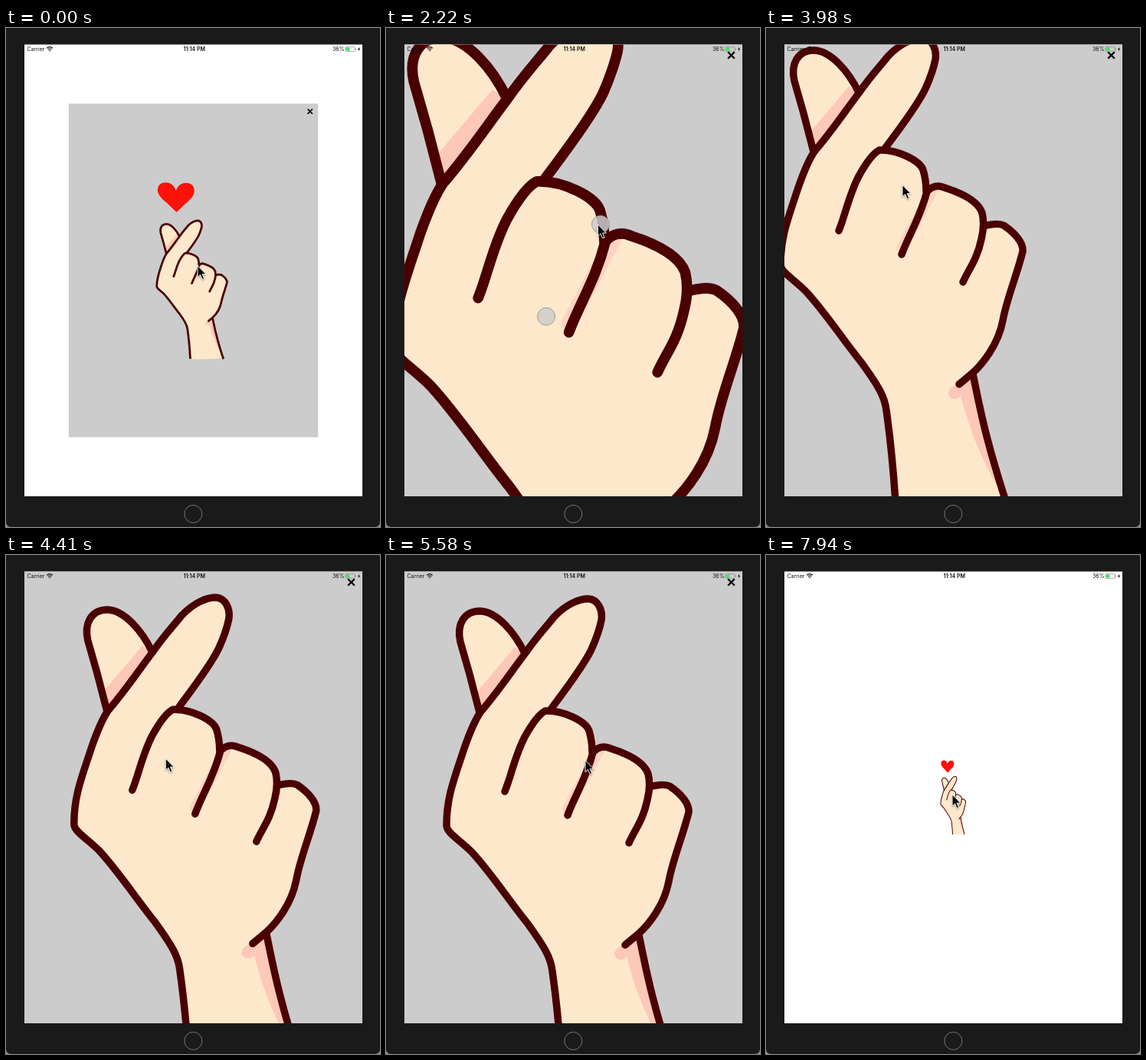
An HTML page for the animation above (8 s loop, 488 px wide and 650 px high).

```html
<!DOCTYPE html>
<html lang="en">
<head>
<meta charset="utf-8">
<title>Pinch to zoom</title>
<style>
  html, body { margin: 0; width: 100%; height: 100%; overflow: hidden; background: #8a8a8a; }
  svg { display: block; width: 488px; height: 650px; }
  text { font: 7px Inter, "Liberation Sans", sans-serif; fill: #111; }
  .skin { fill: #fee8cb; }
  .pink { fill: #fdc8b7; }
  .ink { fill: none; stroke: #4a0000; stroke-width: 9.5; stroke-linecap: round; stroke-linejoin: round; }
  .touch { fill: #ccc; fill-opacity: .85; stroke: #8c8c8c; stroke-width: .8; }
</style>
</head>
<body>
<svg viewBox="0 0 488 650">
  <defs>
    <clipPath id="screen"><rect x="24" y="21.5" width="441" height="588.5"/></clipPath>
    <g id="hand">
      <path fill="#ff1008" d="M171 53L131 14C104 -8 86 -25 86 -47C86 -70 103 -81 122 -81C146 -81 163 -65 168 -42C174 -65 192 -79 213 -79C237 -79 251 -65 251 -45C251 -22 235 -7 211 14Z"/>
      <!-- thumb -->
      <path class="skin" d="M125 238L112 188L100 146C95 124 104 106 126 106C148 107 171 134 184 161Z"/>
      <path class="pink" d="M171 153L184 163L127 238L121 212Z"/>
      <path class="ink" d="M125 238L112 188L100 146C95 124 104 106 126 106C148 107 171 134 184 161"/>
      <!-- palm and wrist -->
      <path class="skin" d="M82 388C82 348 92 325 105 285C112 265 118 250 126 238C150 210 165 187 184 162C200 139 211 128 222 114C238 97 255 90 267 90C280 91 286 105 284 118C282 128 276 145 271 156C262 175 240 205 218 234C242 238 264 250 268 262L273 290C279 283 288 281 296 285C318 292 340 303 345 318L347 335C358 332 366 331 373 334C388 344 399 357 398 368C390 400 377 430 372 458C366 490 345 515 333 526C342 570 348 610 382 712C360 705 345 716 320 709C295 716 260 710 233 712C230 660 225 610 220 575C218 558 211 545 187 512C165 485 140 447 115 420C98 403 82 395 82 388Z"/>
      <path class="pink" d="M301 553C301 546 308 542 315 541L333 528C342 570 348 610 382 700C358 668 332 615 317 556C314 562 302 562 301 553Z"/>
      <path d="M281 287L240 364" stroke="#fdd3c1" stroke-width="14" stroke-linecap="round"/>
      <g class="ink">
        <path d="M233 711C230 660 225 610 220 575C218 558 211 545 187 512C165 485 140 447 115 420C98 403 82 395 82 385C82 348 92 325 105 285C112 265 118 250 126 238C150 210 165 187 184 162C200 139 211 128 222 114C238 97 255 90 267 90C280 91 286 105 284 118C282 128 276 145 271 156C262 175 240 205 218 234" stroke-linecap="butt"/>
        <path d="M158 341C166 322 171 295 184 270C194 252 203 240 211 236C235 235 264 250 268 262C271 272 272 280 272 290"/>
        <path d="M240 372C250 345 264 325 273 290C279 283 288 281 296 285C318 292 340 303 345 318C348 330 347 340 344 352C338 380 328 390 320 408"/>
        <path d="M347 335C358 332 366 331 373 334C388 344 399 357 398 368C390 400 377 430 372 458C366 490 345 515 333 526L315 541"/>
        <path d="M333 528C342 570 348 610 382 712" stroke-linecap="butt"/>
      </g>
    </g>
  </defs>

  <path fill="#1a1a1a" d="M0 0H488V643Q488 650 481 650H7Q0 650 0 643Z"/>
  <circle cx="244.3" cy="633" r="11.5" fill="none" stroke="#777"/>
  <rect x="24" y="21.5" width="441" height="588.5" fill="#fff"/>
  <use href="#hand" transform="matrix(.104 0 0 .122 219.3 277.3)"/>

  <g id="popup" clip-path="url(#screen)">
    <rect x="24" y="21.5" width="441" height="588.5" fill="#ccc"/>
    <use id="photo" href="#hand"/>
    <path d="M446.2 31.2l8.6 8.6m0 -8.6l-8.6 8.6" stroke="#000" stroke-width="2.3"/>
  </g>

  <text x="27.5" y="30">Carrier</text>
  <g fill="none" stroke="#111" stroke-width="1.2">
    <path d="M53.2 26.3Q57 22.9 60.8 26.3M54.7 28Q57 26 59.3 28"/>
    <path d="M56 29.2L57 30.3L58 29.2Z" fill="#111" stroke-width=".5"/>
  </g>
  <text x="245.7" y="30" text-anchor="middle" style="font-weight:600">11:14 PM</text>
  <text x="426" y="30">36%</text>
  <rect x="442.8" y="24.6" width="12.4" height="5.8" rx="1" fill="none" stroke="#888" stroke-width=".7"/>
  <rect x="443.6" y="25.4" width="4.8" height="4.2" fill="#4cd964"/>
  <path d="M456 26.4v2.2" stroke="#888"/>
  <path d="M461.2 24.6L459 28H460.4L459.8 30.4L462.2 27H460.8Z" fill="#111"/>

  <g id="touches">
    <circle class="touch" r="11.5"/>
    <circle class="touch" r="11.5"/>
  </g>
  <path id="cursor" d="M0 0V15.2L3.5 12L6.2 18L8.7 17L6.1 11.2H11Z" stroke="#fff" stroke-width="1" style="filter:drop-shadow(0 1px 1px #0006)"/>
</svg>
<script>
const LOOP = 8000, STEP = 146.8;
const CENTER = [244.5, 315.8];
const PINCH_START = 6, PINCH_END = 19;

// Each key: [step, value, ...]
const popupKeys = [[0, .739], [1, 1], [48, 1], [49, .82], [51, 0]];
const zoomKeys = [[6, .3925], [13, 1.6], [15, 1.445], [16, 1.277], [19, 1]];
const panKeys = [[23, 0, 0], [27, -63, -77], [33, 76.5, 7.5], [38, -3, -33]];
const cursorKeys = [
  [0, 250, 309.5], [3, 250, 309.5], [6, 250.6, 299], [19, 265.5, 274],
  [23, 259, 302.5], [27, 178, 204.5], [33, 238.5, 325.5], [38, 260, 267.5],
  [40, 321, 150], [45, 450, 38], [49, 450, 38], [54, 243, 312]
];

const $ = id => document.getElementById(id);
const place = (node, x, y, scale = 1) =>
  node.setAttribute("transform", `translate(${x} ${y}) scale(${scale})`);

function sample(keys, step) {
  const next = keys.findIndex(key => key[0] > step);
  if (next === 0) return keys[0].slice(1);
  if (next < 0) return keys[keys.length - 1].slice(1);
  const a = keys[next - 1], b = keys[next];
  const u = (step - a[0]) / (b[0] - a[0]);
  const eased = u * u * (3 - 2 * u);
  return a.slice(1).map((v, i) => v + (b[i + 1] - v) * eased);
}

function draw(time) {
  const step = Math.floor(time / STEP);
  const [popup] = sample(popupKeys, step);
  const [zoom] = sample(zoomKeys, step);
  const [panX, panY] = sample(panKeys, step);
  let [x, y] = sample(cursorKeys, step);

  place($("popup"), CENTER[0] * (1 - popup), CENTER[1] * (1 - popup), popup);
  place($("photo"), 243 * (1 - zoom) + panX, 317 * (1 - zoom) + panY, zoom);

  // Two fingers mirrored about the centre; their distance follows the zoom.
  const pinching = step >= PINCH_START && step < PINCH_END;
  $("touches").style.display = pinching ? "" : "none";
  if (pinching) {
    const dx = 24.5 * zoom, dy = -41.5 * zoom;
    const [near, far] = $("touches").children;
    place(near, CENTER[0] + dx, CENTER[1] + dy);
    place(far, CENTER[0] - dx, CENTER[1] - dy);
    x = CENTER[0] + dx - 3.5;
    y = CENTER[1] + dy;
  }
  place($("cursor"), x, y);
}

const start = performance.now();
function tick() {
  draw((performance.now() - start) % LOOP);
  requestAnimationFrame(tick);
}
tick();
</script>
</body>
</html>
```
